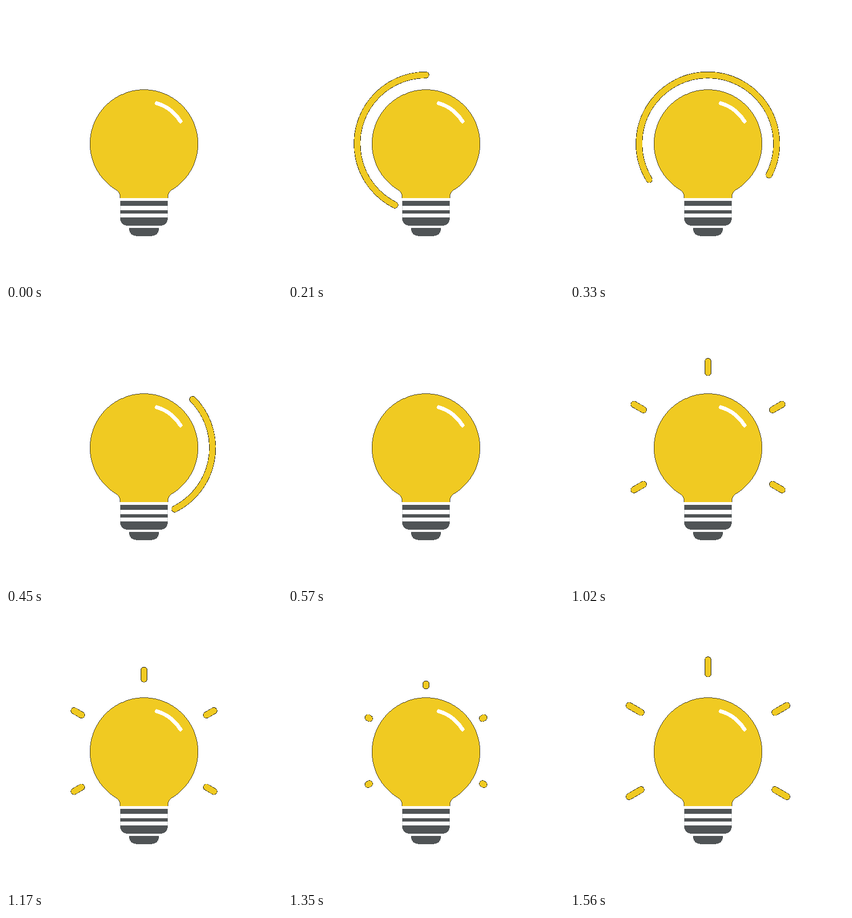
An HTML page that plays this animation: 500x500 px, repeating every 1.98 s.

```html
<!DOCTYPE html>
<html lang="en">
<head>
<meta charset="utf-8">
<title>Light bulb</title>
<style>
  @property --head { syntax: "<number>"; inherits: true; initial-value: 0; }
  @property --tail { syntax: "<number>"; inherits: true; initial-value: 0; }
  @property --grow { syntax: "<number>"; inherits: true; initial-value: 0; }

  html, body { margin: 0; width: 100%; height: 100%; overflow: hidden; background: #fff; }
  svg { display: block; width: 100%; height: 100%; shape-rendering: crispEdges; }

  .bulb { fill: #f0ca22; stroke: #1c190c; stroke-width: .8; }
  .metal { fill: #505456; }
  .sides { fill: none; stroke: #d5d9db; stroke-width: 1; }
  .shine { fill: none; stroke: #fff; stroke-width: 7; stroke-linecap: round; }

  .orbit, .rays { fill: none; stroke-linecap: round; }
  .edge { stroke: #1c190c; stroke-width: 12.2; }
  .body { stroke: #f0ca22; stroke-width: 10.8; }

  /* Both ends of the orbit are eased with 3x² - 2x³. */
  .orbit {
    --from: calc(var(--tail) * var(--tail) * (3 - 2 * var(--tail)));
    --to: calc(var(--head) * var(--head) * (3 - 2 * var(--head)));
    stroke-dasharray: calc((var(--to) - var(--from)) * 100px) 999px;
    stroke-dashoffset: calc(var(--from) * -100px);
    animation: head 1980ms -1ms infinite, tail 1980ms -1ms infinite,
               orbit-show 1980ms -1ms step-end infinite;
  }
  .rays {
    stroke-dasharray: calc(var(--grow) * 25px) 999px;
    stroke-dashoffset: calc(var(--grow) * -25px);
    animation: grow 1980ms -1ms infinite, rays-show 1980ms -1ms step-end infinite;
  }

  @keyframes head {
    0% { --head: 0; animation-timing-function: steps(14); }
    21.212%, 100% { --head: 1; }
  }
  @keyframes tail {
    0% { --tail: 0; }
    13.636% { --tail: 0; animation-timing-function: steps(10); }
    28.788%, 100% { --tail: 1; }
  }
  @keyframes orbit-show {
    0% { visibility: hidden; }
    1.515% { visibility: visible; }
    28.788%, 100% { visibility: hidden; }
  }
  @keyframes grow {
    0% { --grow: 0; }
    39.394% { --grow: 0; animation-timing-function: steps(10); }
    54.545% { --grow: 1; animation-timing-function: steps(8); }
    66.667% { --grow: 0; animation-timing-function: steps(8); }
    78.788%, 100% { --grow: 1; }
  }
  @keyframes rays-show {
    0% { visibility: hidden; }
    40.909% { visibility: visible; }
    66.667% { visibility: hidden; }
    68.182%, 100% { visibility: visible; }
  }
</style>
</head>
<body>
<svg viewBox="0 0 500 500">
  <defs>
    <path id="ring" pathLength="100" d="M193.7 360.6A124.5 124.5 0 1 1 305.7 360.6"/>
    <path id="ray" d="M0 -115V-166"/>
    <g id="fan" transform="translate(250 248.3)">
      <use href="#ray"/>
      <use href="#ray" transform="rotate(60)"/>
      <use href="#ray" transform="rotate(120)"/>
      <use href="#ray" transform="rotate(240)"/>
      <use href="#ray" transform="rotate(300)"/>
    </g>
  </defs>

  <g class="orbit">
    <use href="#ring" class="edge"/>
    <use href="#ring" class="body"/>
  </g>
  <g class="rays">
    <use href="#fan" class="edge"/>
    <use href="#fan" class="body"/>
  </g>

  <path class="bulb" d="M207 348Q206.8 338.5 202 334.6A97.8 97.8 0 1 1 298 334.6Q293.2 338.5 293 348"/>
  <path class="shine" d="M273 176A77 77 0 0 1 316 209"/>

  <path class="sides" d="M207.5 354V384M292.5 354V384"/>
  <g class="metal">
    <path d="M207 354.5Q207 353 208.5 353H291.5Q293 353 293 354.5V362H207Z"/>
    <path d="M207 369.5H293V376H207Z"/>
    <path d="M207 383H293V385A13 13 0 0 1 280 398H220A13 13 0 0 1 207 385Z"/>
    <path d="M223 401.5H277V404A12.5 12.5 0 0 1 264.5 416.5H235.5A12.5 12.5 0 0 1 223 404Z"/>
  </g>
</svg>
</body>
</html>
```
